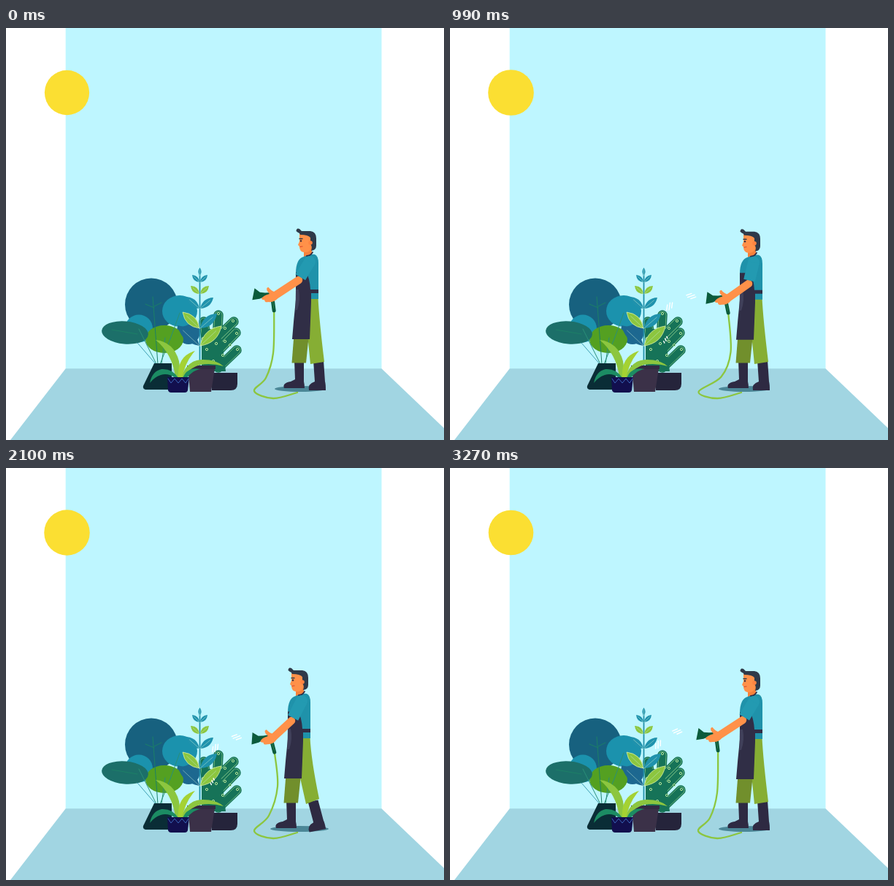
An HTML page for the animation above (3300 ms loop, 600x564 px).

```html
<!DOCTYPE html>
<html lang="en">
<head>
<meta charset="utf-8">
<title>Watering the plants</title>
<style>
  html, body { margin: 0; width: 100%; height: 100%; overflow: hidden; background: #fff; }
  svg { display: block; width: 100%; height: 100%; }
  path { stroke-linecap: round; stroke-linejoin: round; }
  #sleeve { stroke-linecap: butt; }
</style>
</head>
<body>
<svg viewBox="0 0 600 564">
  <path d="M81.700 0H514.500V467H81.700Z" fill="#bef6ff"/>
  <path d="M81.700 466.200H514.500L617 564H6Z" fill="#a1d5e2"/>
  <circle id="sun" cx="83.500" cy="88.500" fill="#fbdf32"/>

  <!-- round-leaved plant -->
  <circle cx="199" cy="378.500" r="36" fill="#17617f"/>
  <ellipse cx="250" cy="415" rx="16" ry="18" fill="#1d6890"/>
  <circle cx="182" cy="411.500" r="19" fill="#1b92ad"/>
  <ellipse cx="238" cy="387.500" rx="24" ry="21.500" fill="#1b92ad"/>
  <ellipse cx="217" cy="426" rx="26" ry="19" fill="#54a021"/>
  <ellipse cx="163" cy="417" rx="32" ry="15.500" transform="rotate(5 163 417)" fill="#1c6f69"/>
  <g fill="none" stroke="#1c8067" stroke-width="1">
    <path d="M201 368L208 460M203 383L191 378M203 381L213 376M145 413L180 419"/>
    <path d="M238 390Q226 425 211 460M218 424L213 460M182 412L206 460" stroke="#2a8f78"/>
    <path d="M180 431L206 461" stroke="#3f9fb4"/>
  </g>
  <path d="M203 459H227V495H191Q187 494 188 490Z" fill="#0a2d36"/>

  <!-- cactus -->
  <g id="cactus" fill="none"></g>
  <path d="M282 472H317V487Q317 496 308 496H282Z" fill="#25243b"/>

  <!-- tall plant -->
  <path d="M265.500 332V463" stroke="#2492aa" stroke-width="1.800"/>
  <g id="leaves"></g>

  <!-- pots and fan of long leaves -->
  <path d="M249 463H286.500L281 498H252Z" fill="#3b3148"/>
  <path d="M248 462H287V467H249Z" fill="#322a42"/>
  <path d="M240 479Q247 454 270 454Q288 454 298 463Q281 458 266 461Q251 465 243 479Z" fill="#8cc63f"/>
  <path d="M242 479Q249 463 267 467Q256 468 247 480Z" fill="#1c8c63"/>
  <path d="M232 478Q228 446 205 427Q230 430 237 456Q239 468 238 478Z" fill="#8cc63f"/>
  <path d="M236 479Q234 449 259 442Q246 456 241 479Z" fill="#a4d233"/>
  <path d="M232 479Q222 472 212 475Q203 478 197 486Q200 470 213 467Q228 466 236 479Z" fill="#1c8c63"/>
  <path d="M221 478H251L249 496Q248 499 245 499H226Q223 499 222 496Z" fill="#120f4e"/>
  <path d="M222 480L226 486L231 480L236 486L241 480L246 486L250 480" fill="none" stroke="#3a66b8"/>

  <!-- gardener -->
  <ellipse id="shadow" cy="494" ry="4" fill="#4b8797"/>
  <path id="hose" fill="none" stroke="#8cc63f" stroke-width="2.300"/>
  <g id="backBoot" fill="#2e2a42">
    <path d="M421 455H435L437 484Q438 487 438 496H415Q413 487 423 484Z"/>
  </g>
  <path id="backLeg" fill="#86ae34"/>
  <g id="frontBoot" fill="#2e2a42">
    <path d="M395 455H408L408 484Q409 488 409 493H381Q378 486 390 484L396 481Z"/>
  </g>
  <path id="frontLeg" fill="#718f2c"/>
  <g id="body">
    <path d="M408 298H419V313H408Z" fill="#f5823c"/>
    <path d="M402 282H419V300Q416 308 408 307Q402 306 402 299L400 297L402 292Z" fill="#ff9149"/>
    <path d="M397.500 278Q398 273 402 275L405 278H417Q425 279 425 288V298Q425 304 418 305Q420 299 417 296V287Q414 283 403 283Q402 280 400 280Z" fill="#2f3a49"/>
    <circle cx="417" cy="294" r="2.800" fill="#ff8440"/>
    <path d="M402 288.500H406" stroke="#2f3a49" stroke-width="1.300"/>
    <circle cx="404" cy="291.500" r="1.200" fill="#2f2a3c"/>
    <path d="M403 299.500L406 299" stroke="#d8482f" stroke-width="1.200"/>
    <path d="M397 336Q397 316 408 313Q418 309 423 310Q428 312 428 322V371H397Z" fill="#1f92aa"/>
    <path d="M412 312Q417 312 420 307" fill="none" stroke="#2f2d46" stroke-width="1.800"/>
    <path d="M397 334.500H411Q416 342 417 358H428V363H418V375L416 426H392Q394 400 397 372Z" fill="#302e46"/>
    <path d="M397 358H401Q404 372 399 386H396.500Z" fill="#40405a"/>
  </g>
  <g id="gun" fill="#0b5b3c">
    <path d="M-22 -10L-26 6L-16 5L-7 2L2 3V-3L-8 -3L-15 -4Z"/>
    <path d="M0 0L2 9L3 22" fill="none" stroke="#0b5b3c" stroke-width="5"/>
    <path d="M2 10L3 19" stroke="#2a7d4d" stroke-width="1"/>
  </g>
  <path id="forearm" stroke="#ff9149" stroke-width="10.500"/>
  <path id="hand" d="M8 -4Q1 -6 -2 -11Q-6 -11 -4 -6L-1 -2Q-10 0 -12 4Q-12 6 -8 6Q-8 10 -3 9Q6 10 10 4Z" fill="#ff9149"/>
  <circle id="shoulder" r="8" fill="#239ab1"/>
  <path id="sleeve" stroke="#239ab1" stroke-width="16"/>
  <path id="water" fill="none" stroke="#fff" stroke-width="1.400"/>
</svg>
<script>
const LOOP = 3300;
const $ = id => document.getElementById(id);
const set = (id, name, value) => $(id).setAttribute(name, value);
const mix = (a, b, u) => a + (b - a) * u;
const ease = u => { u = Math.min(1, Math.max(0, u)); return u * u * (3 - 2 * u); };
const turn = ([x, y], deg) => {
  const a = deg * Math.PI / 180, c = Math.cos(a), s = Math.sin(a);
  return [x * c - y * s, x * s + y * c];
};

// time, body bob, elbow, gun joint, gun angle, three hose points
const poses = [
  [0, 0, 401, 345, 363, 365, -3, 366, 445, 356, 479, 340, 497],
  [570, 0, 411, 350, 379, 367, 4, 377, 440, 371, 476, 340, 498],
  [1410, 1.5, 407, 350, 372, 370, -18, 392, 447, 372, 479, 341, 498],
  [2100, -1, 391, 346, 361, 368, -10, 372, 436, 360, 476, 340, 497],
  [2430, 1, 383, 339, 342, 347, 20, 319, 430, 321, 468, 332, 491],
  [2790, .5, 395, 348, 359, 358, 5, 357, 430, 357, 478, 339, 497]
];
poses.push([LOOP, ...poses[0].slice(1)]);

function poseAt(t) {
  const i = poses.findIndex(p => p[0] > t), a = poses[i - 1], b = poses[i];
  const u = ease((t - a[0]) / (b[0] - a[0]));
  return a.map((v, k) => mix(v, b[k], u));
}

// smooth path through points
function spline(pts) {
  let d = 'M' + pts[0];
  for (let i = 0; i < pts.length - 1; i++) {
    const p = pts[Math.max(0, i - 1)], a = pts[i], b = pts[i + 1], q = pts[Math.min(pts.length - 1, i + 2)];
    d += `C${[0, 1].map(k => a[k] + (b[k] - p[k]) / 6)} ${[0, 1].map(k => b[k] - (q[k] - a[k]) / 6)} ${b}`;
  }
  return d;
}

function drawCactus() {
  const arms = 'M291 393L287 462M271 402L279 462M279 434L312 402M283 450L315 417M291 465L316 441';
  const dots = [[291, 391], [311, 401], [316, 418], [317, 440], [272, 402], [285, 412], [300, 411],
    [300, 429], [288, 432], [275, 440], [297, 448], [307, 434], [284, 456], [270, 425]];
  const lines = [['#167358', 13.5], ['#8fcf8c', 10.6], ['#167358', 9.4]];
  $('cactus').innerHTML =
    lines.map(([color, w]) => `<path d="${arms}" stroke="${color}" stroke-width="${w}"/>`).join('') +
    '<path d="M268 412L288 412L296 428L301 470H268Z" fill="#167358"/>' +
    dots.map(([x, y]) => `<circle cx="${x}" cy="${y}" r="1.600" fill="#167358" stroke="#b9e69a"/>`).join('');
}

function drawLeaves() {
  const teal = '#1f92ad', lime = '#8cc63f', blue = '#1d6890';
  // base y, left tip, right tip, width, colours
  const pairs = [
    [348, 255, 338, 276, 338, 6, teal, teal],
    [364, 253, 353, 278, 353, 7, lime, lime],
    [384, 247, 368, 284, 369, 9, teal, teal],
    [411, 242, 389, 289, 391, 12, lime, teal],
    [435, 235, 407, 295, 408, 14, blue, lime]
  ];
  const leaf = (x, y, tx, ty, w, fill) => {
    const dx = tx - x, dy = ty - y, n = Math.hypot(dx, dy), mx = x + dx / 2, my = y + dy / 2;
    const ox = -dy / n * w, oy = dx / n * w;
    const rim = w > 10 && fill === lime ? '#d9f0a8' : 'none';
    return `<path d="M${x} ${y}Q${mx + ox} ${my + oy} ${tx} ${ty}Q${mx - ox} ${my - oy} ${x} ${y}" fill="${fill}" stroke="${rim}" stroke-width=".8"/>
      <path d="M${x} ${y}L${mx + dx / 4} ${my + dy / 4}" stroke="#bfe8d0" stroke-width=".5"/>`;
  };
  $('leaves').innerHTML = leaf(265.5, 339, 265.5, 328, 4, teal) +
    pairs.map(([y, lx, ly, rx, ry, w, lc, rc]) =>
      leaf(265, y, lx, ly, w, lc) + leaf(266, y, rx, ry, w, rc)).join('');
}

function waterPath(t, tip, angle) {
  const curve = [[0, 0], [-45, -14], [-60, 5], [-58, 60]].map(p => turn(p, angle * .6));
  const along = (u, k) => {
    const v = 1 - u;
    return 3 * v * v * u * curve[1][k] + 3 * v * u * u * curve[2][k] + u ** 3 * curve[3][k];
  };
  let d = '';
  for (let end = 662; end < LOOP + 925; end += 370) {
    const start = Math.max(20, end - 925), u = (t - start) / (end - start);
    if (u <= 0 || u >= 1) continue;
    const x = along(u, 0), y = along(u, 1);
    const [vx, vy] = turn([along(u + .02, 0) - x, along(u + .02, 1) - y], -20), n = Math.hypot(vx, vy);
    const size = Math.min(1, u * 12, (1 - u) * 8);
    for (let j = -1; j <= 1; j++) {
      const half = (5 - Math.abs(j) * 1.3) * size, shift = j * 2;
      const cx = tip[0] + x - vy / n * j * 3.2 + vx / n * shift;
      const cy = tip[1] + y + vx / n * j * 3.2 + vy / n * shift;
      d += `M${cx - vx / n * half} ${cy - vy / n * half}L${cx + vx / n * half} ${cy + vy / n * half}`;
    }
  }
  return d;
}

function draw(t) {
  set('sun', 'r', 30.4 + 1.4 * (1 - Math.cos((t - 105) / 1100 * 2 * Math.PI)));
  const [, bob, ex, ey, jx, jy, angle, ...h] = poseAt(t);

  // one step forward, later one step back
  const step = ease((t - 1640) / 440) - ease((t - 2560) / 575);
  const dx = -11 * step, lift = -5 * Math.sin(Math.PI * step);
  set('body', 'transform', `translate(${dx} ${bob})`);
  set('frontBoot', 'transform', `translate(${dx} ${lift})`);
  set('frontLeg', 'd', `M${396 + dx} 400H${417 + dx}L${411 + dx} ${458.5 + lift}H${391.5 + dx}Z`);
  set('backBoot', 'transform', `rotate(${-11 * step} 428 494)`);
  set('backLeg', 'd', `M${412 + dx} 369H${427.5 + dx}Q${429 + dx} 400 ${436 - 7 * step} ${457 - 4 * step}` +
    `L${417 - 6 * step} 460L${413 + dx} 420Z`);
  set('shadow', 'cx', 403 - step);
  set('shadow', 'rx', 35 + 5 * step);

  const place = p => { const [x, y] = turn(p, angle); return [jx + x, jy + y]; };
  const sx = 416 + dx, sy = 320 + bob;
  set('gun', 'transform', `translate(${jx} ${jy}) rotate(${angle})`);
  set('hand', 'transform', `translate(${jx - 1} ${jy + 1}) rotate(${angle / 2})`);
  set('forearm', 'd', `M${ex} ${ey}L${jx + 3} ${jy + 3}`);
  set('shoulder', 'cx', sx);
  set('shoulder', 'cy', sy);
  set('sleeve', 'd', `M${sx} ${sy}L${mix(sx, ex, .85)} ${mix(sy, ey, .85)}`);
  set('hose', 'd', spline([place([3, 24]), [h[0], h[1]], [h[2], h[3]], [h[4], h[5]], [366, 507], [399, 499]]));
  set('water', 'd', waterPath(t, place([-26, -2]), angle));
}

drawCactus();
drawLeaves();
const begin = performance.now();
function frame() {
  draw((performance.now() - begin) % LOOP);
  requestAnimationFrame(frame);
}
frame();
</script>
</body>
</html>
```
